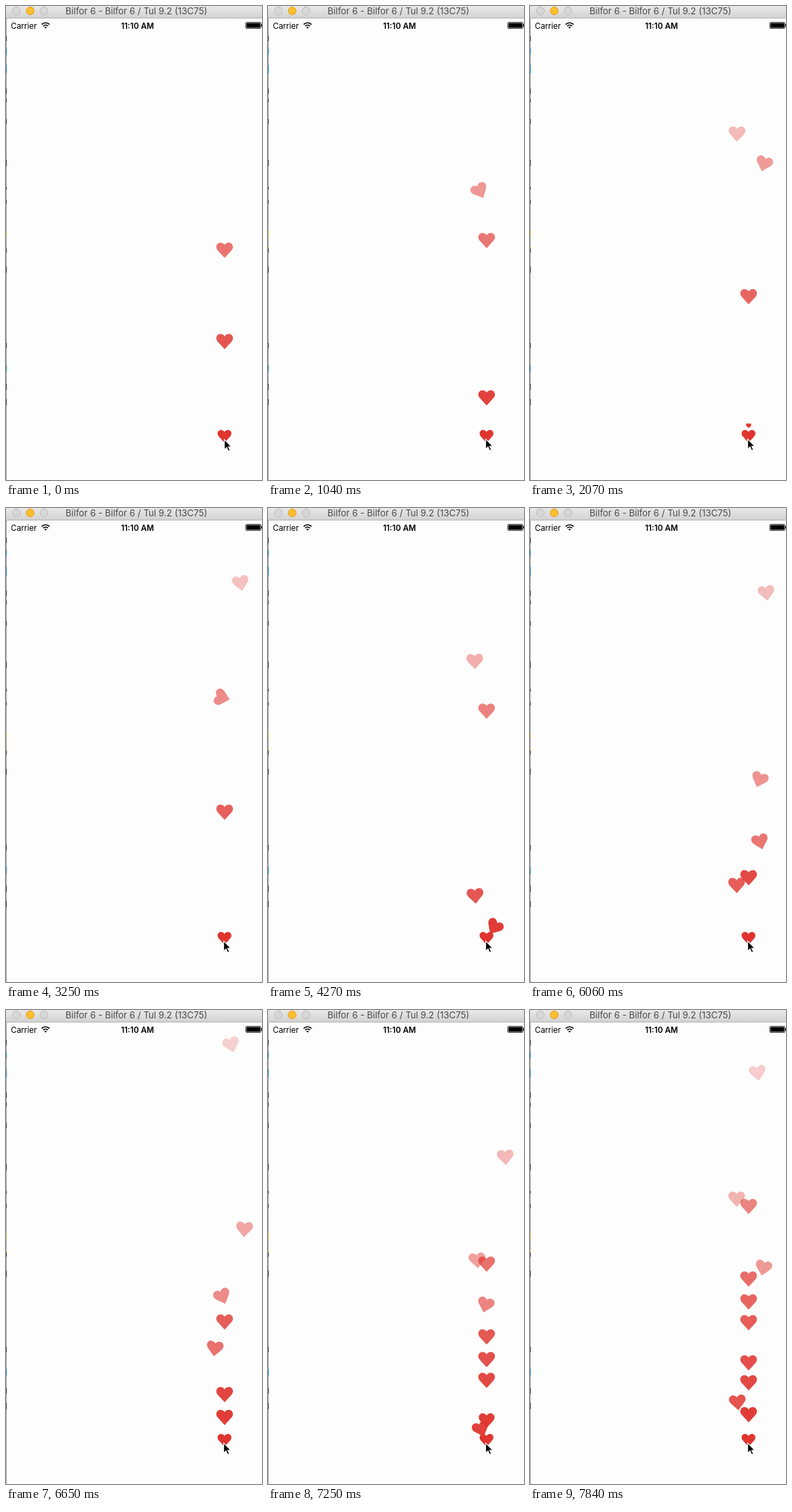
Write an HTML page that moves like this. It is 370 px wide and 684 px high and loops after 7.99 s.

```html
<!DOCTYPE html>
<html lang="en">
<head>
<meta charset="utf-8">
<title>Floating hearts</title>
<style>
  html, body { margin: 0; width: 100%; height: 100%; overflow: hidden; background: #fdfdfd; }
  svg { display: block; font-family: Inter, Roboto, sans-serif; }
</style>
</head>
<body>
<svg width="370" height="684" viewBox="0 0 370 684">
  <defs>
    <linearGradient id="bar" x2="0" y2="1">
      <stop stop-color="#e9e9e9"/>
      <stop offset="1" stop-color="#d2d2d2"/>
    </linearGradient>
    <path id="heart" fill="#e0342f" d="M0-7.6C-1.5-10-4-11-6-11C-9.4-11-12-8.3-12-5C-12-2.6-11-1-9.5.7L0 11 9.5.7C11-1 12-2.6 12-5C12-8.3 9.4-11 6-11C4-11 1.5-10 0-7.6Z"/>
  </defs>
  <rect width="370" height="684" fill="#fdfdfd"/>

  <g id="hearts"></g>
  <use href="#heart" transform="translate(315.8 621) scale(.83)"/>

  <!-- status bar -->
  <text x="7" y="32.5" font-size="11.5">Carrier</text>
  <g fill="none" stroke="#000" stroke-width="1.7">
    <path d="M51.6 26.6A8 8 0 0 1 62.9 26.6M53.7 29A5 5 0 0 1 60.8 29"/>
    <path d="M57.2 32.6L55.3 30.8A2.8 2.8 0 0 1 59.1 30.8Z" fill="#000" stroke="none"/>
  </g>
  <text x="190" y="32.5" font-size="11.5" font-weight="600" text-anchor="middle">11:10 AM</text>
  <rect x="346.5" y="23.5" width="22" height="9" rx="1.5" fill="none" stroke="#000" stroke-width=".7"/>
  <rect x="347.5" y="24.5" width="20" height="7" rx=".5"/>
  <rect x="369" y="26.5" width="1" height="3"/>

  <!-- window frame -->
  <path d="M.5 17V684" stroke="#a4a4a4"/>
  <g fill="none">
    <path d="M.5 43v8m0 68v8m0 7v5m0 24v7m0 52v9m0 30v4m0 15v5m0 63v8m0 20v9m0 101v8m0 51v9m0 13v9" stroke="#333"/>
    <path d="M.5 60v10m0 15v12m0 421v10" stroke="#1780b8"/>
    <path d="M.5 5v5m0 313v10m0 13v4" stroke="#c9b440"/>
  </g>
  <rect width="370" height="17" fill="url(#bar)"/>
  <rect y="17" width="370" height="1" fill="#b4b4b4"/>
  <g stroke-width="1">
    <circle cx="15" cy="7" r="5.7" fill="#d7d7d7" stroke="#bdbdbd"/>
    <circle cx="35" cy="7" r="5.7" fill="#fdbe2e" stroke="#e0a127"/>
    <circle cx="55" cy="7" r="5.7" fill="#d7d7d7" stroke="#bdbdbd"/>
  </g>
  <text x="188.5" y="12" font-size="13" fill="#484848" text-anchor="middle">Bilfor 6 - Bilfor 6 / Tul 9.2 (13C75)</text>

  <path id="cursor" d="M0 0V14.6L3.4 11.4 5.8 16.8 8.3 15.7 5.9 10.5H10.4Z" stroke="#fff" stroke-width="1.1"/>
</svg>
<script>
const LOOP = 7990, STEP = 147.8, LAST_STEP = 53;
const LIFE = 4.93, FADE = 6, CENTER_X = 316;

// Cubic Bézier legs: x offsets of the two inner points, then the four heights.
const LEFT = [0, -20, -26, 0], RIGHT = [0, 43, 36, 0], STRAIGHT = [0, 0, 0, 0];
const leg = (x, ...y) => ({ x, y });
const rise = leg(STRAIGHT, 621, 505.2, 389.3, 273.5);
const riseLeft = [rise, leg(LEFT, 273.5, 278.5, 201.5, 18)];
const riseRight = [rise, leg(RIGHT, 273.5, 213.5, 132.7, 18)];
const waveLeft = [leg(LEFT, 621, 594, 511, 420), leg(RIGHT, 420, 374, 198, 18)];
const waveRight = [leg(RIGHT, 621, 561, 552.5, 420), leg(LEFT, 420, 389, 233, 18)];

// Birth time in seconds and route of each heart.
const hearts = [
  [-1.905, riseLeft], [-0.97, riseRight], [0.64, riseLeft], [1.961, riseRight],
  [3.24, waveLeft], [4.05, waveRight], [4.83, waveLeft], [5.439, riseLeft],
  [6.183, riseRight], [6.416, riseLeft], [6.629, riseRight], [6.87, waveLeft],
  [7.04, riseLeft], [7.245, riseRight], [7.571, riseLeft]
].map(([birth, route]) => {
  const node = document.createElementNS('http://www.w3.org/2000/svg', 'use');
  node.setAttribute('href', '#heart');
  document.getElementById('hearts').append(node);
  return { birth, route, node };
});
const cursor = document.getElementById('cursor');

const clamp = v => Math.min(1, Math.max(0, v));
const point = ([a, b, c, d], u) => {
  const v = 1 - u;
  return v * v * v * a + 3 * v * v * u * b + 3 * v * u * u * c + u * u * u * d;
};
const slope = ([a, b, c, d], u) => {
  const v = 1 - u;
  return v * v * (b - a) + 2 * v * u * (c - b) + u * u * (d - c);
};

function place({ birth, route, node }, time) {
  const age = time - birth;
  const visible = age > 0 && age < LIFE;
  node.setAttribute('visibility', visible ? 'visible' : 'hidden');
  if (!visible) return;
  const progress = 2 * age / LIFE;
  const index = Math.floor(progress), u = progress - index;
  const { x, y } = route[index];
  const angle = Math.atan2(slope(x, u), -slope(y, u)) * 180 / Math.PI;
  const scale = clamp((age - 0.06) / 0.15);
  node.setAttribute('transform',
    `translate(${CENTER_X + point(x, u)} ${point(y, u)}) rotate(${angle}) scale(${scale})`);
  node.setAttribute('opacity', 1 - age / FADE);
}

const start = performance.now();
function draw(now) {
  const elapsed = Math.max(0, now - start) % LOOP;
  // The picture advances in even steps rather than continuously.
  const step = Math.min(LAST_STEP, Math.floor((elapsed + 20) / STEP));
  const time = step * STEP / 1000;
  hearts.forEach(heart => place(heart, time));
  cursor.setAttribute('transform', time < 0.75 ? 'translate(315.6 625.6)' : 'translate(314.6 624.8)');
  requestAnimationFrame(draw);
}
draw(start);
</script>
</body>
</html>
```
